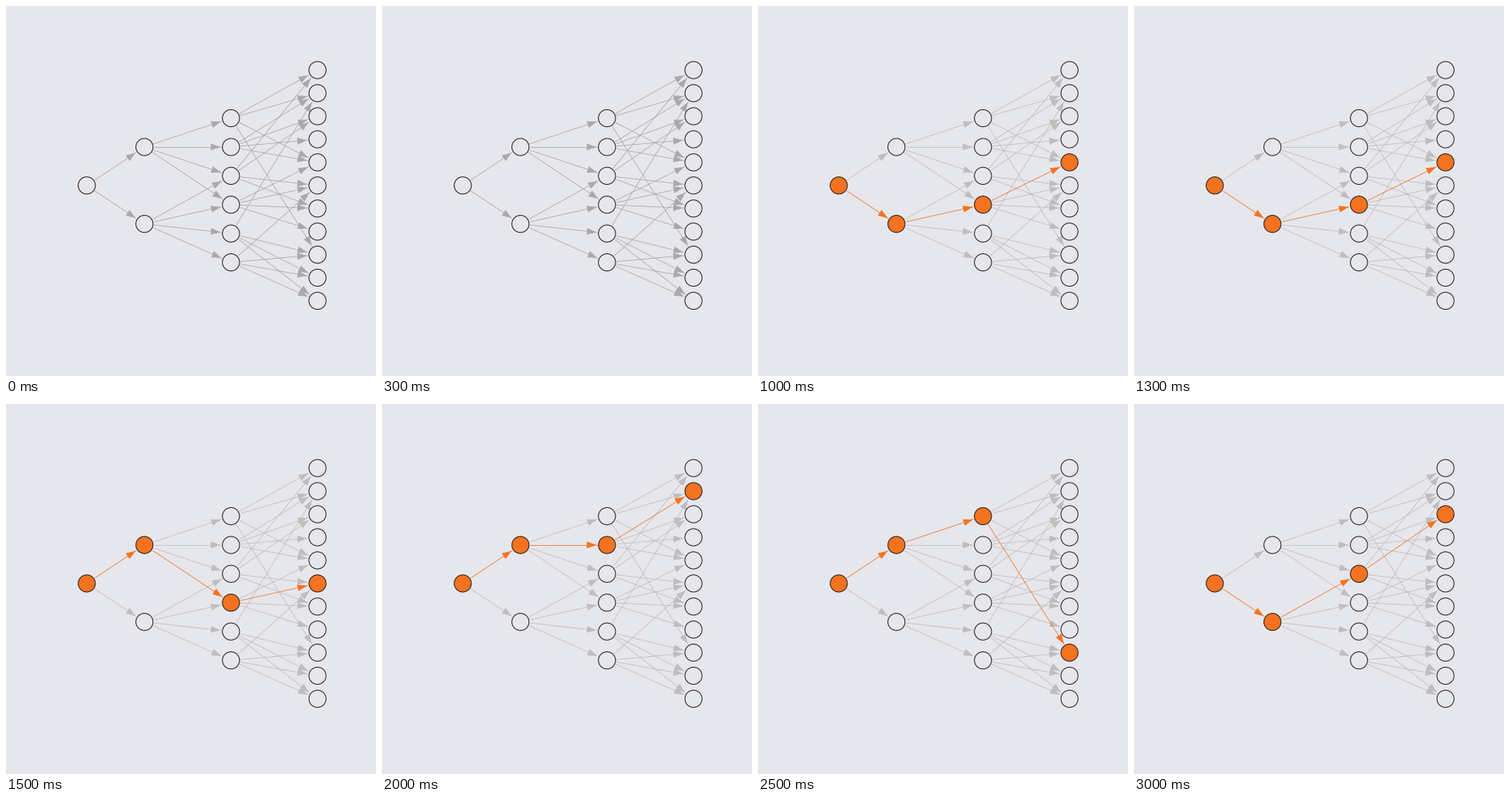
Animation, 480 px wide and 480 px high, one loop 3500 ms. Source, as a matplotlib script:

```python
import numpy as np
import matplotlib.pyplot as plt
from matplotlib.animation import FuncAnimation
from matplotlib.patches import Circle, Polygon

SIZE, DPI = 480, 100
PX = 72 / DPI  # points per pixel
BG, INK, ORANGE = "#e6e7ec", "#1a1a1a", "#f57320"
GRAY, FADED = "#a9a9a9", "#bebebe"
RADIUS, GAP = 11.1, 12.5
TIP_GAP, HEAD_LEN, HEAD_HALF = 13.6, 12.6, 4.4

# The last layer's height sets the scale of the whole tree
LEFT, MIDDLE, SPAN = 104.8, 232.8, 299.3
UNIT = SPAN / 8


def column(step, count, height, shift=0):
    """Nodes spread evenly over a share of the full height."""
    x, y = LEFT + step * UNIT, MIDDLE + shift
    half = height * SPAN / 2
    ys = np.linspace(-half, half, count) if count > 1 else [0]
    return [np.array([x, y + dy]) for dy in ys]


NODES = [column(0, 1, 0), column(2, 2, 1 / 3),
         column(5, 6, 5 / 8, UNIT / 6), column(8, 11, 1)]

# Each inner node feeds a run of leaves plus a few far ones
RUNS = [range(0, 2), range(1, 5), range(5, 7), range(4, 8),
        range(8, 11), range(8, 11)]
FAR = {0: (4, 8), 2: (0, 2), 4: (1,), 5: (5,)}


def children(layer, i):
    if layer == 0:
        return range(2)
    if layer == 1:
        return range(2 * i, 2 * i + 4)
    return [*RUNS[i], *FAR.get(i, ())]


# Inner node and leaf of each highlighted route
STOPS = [(5, 8), (3, 4), (3, 5), (1, 1), (0, 8), (2, 2)]


def route_at(step):
    """Node index per layer; the first step highlights nothing."""
    if step == 0:
        return None
    branch = int(step % 6 < 3)
    return (0, branch, *STOPS[step - 1])


fig = plt.figure(figsize=(SIZE / DPI, SIZE / DPI), dpi=DPI, facecolor=BG)
ax = fig.add_axes([0, 0, 1, 1])
ax.set_xlim(0, SIZE)
ax.set_ylim(SIZE, 0)
ax.axis("off")


def add_arrow(start, end):
    along = (end - start) / np.linalg.norm(end - start)
    side = np.array([-along[1], along[0]]) * HEAD_HALF
    tip = end - TIP_GAP * along
    base = tip - HEAD_LEN * along
    line, = ax.plot(*zip(start + GAP * along, end - GAP * along),
                    lw=0.8 * PX, solid_capstyle="butt")
    head = ax.add_patch(Polygon([tip, base + side, base - side], lw=0))
    return line, head


def add_node(center):
    return ax.add_patch(Circle(center, RADIUS, ec=INK, lw=PX, zorder=5))


arrows = {
    (layer, i, j): add_arrow(start, NODES[layer + 1][j])
    for layer, starts in enumerate(NODES[:-1])
    for i, start in enumerate(starts)
    for j in children(layer, i)
}
circles = {(layer, i): add_node(center)
           for layer, centers in enumerate(NODES)
           for i, center in enumerate(centers)}


def update(step):
    route = route_at(step)
    idle = FADED if route else GRAY
    for (layer, i, j), parts in arrows.items():
        active = bool(route) and route[layer:layer + 2] == (i, j)
        for part in parts:
            part.set(color=ORANGE if active else idle,
                     zorder=3 if active else 2)
    for (layer, i), circle in circles.items():
        active = bool(route) and route[layer] == i
        circle.set_facecolor(ORANGE if active else BG)
    return []


anim = FuncAnimation(fig, update, frames=len(STOPS) + 1, interval=500,
                     repeat=True, repeat_delay=0, blit=False)
plt.show()
```
